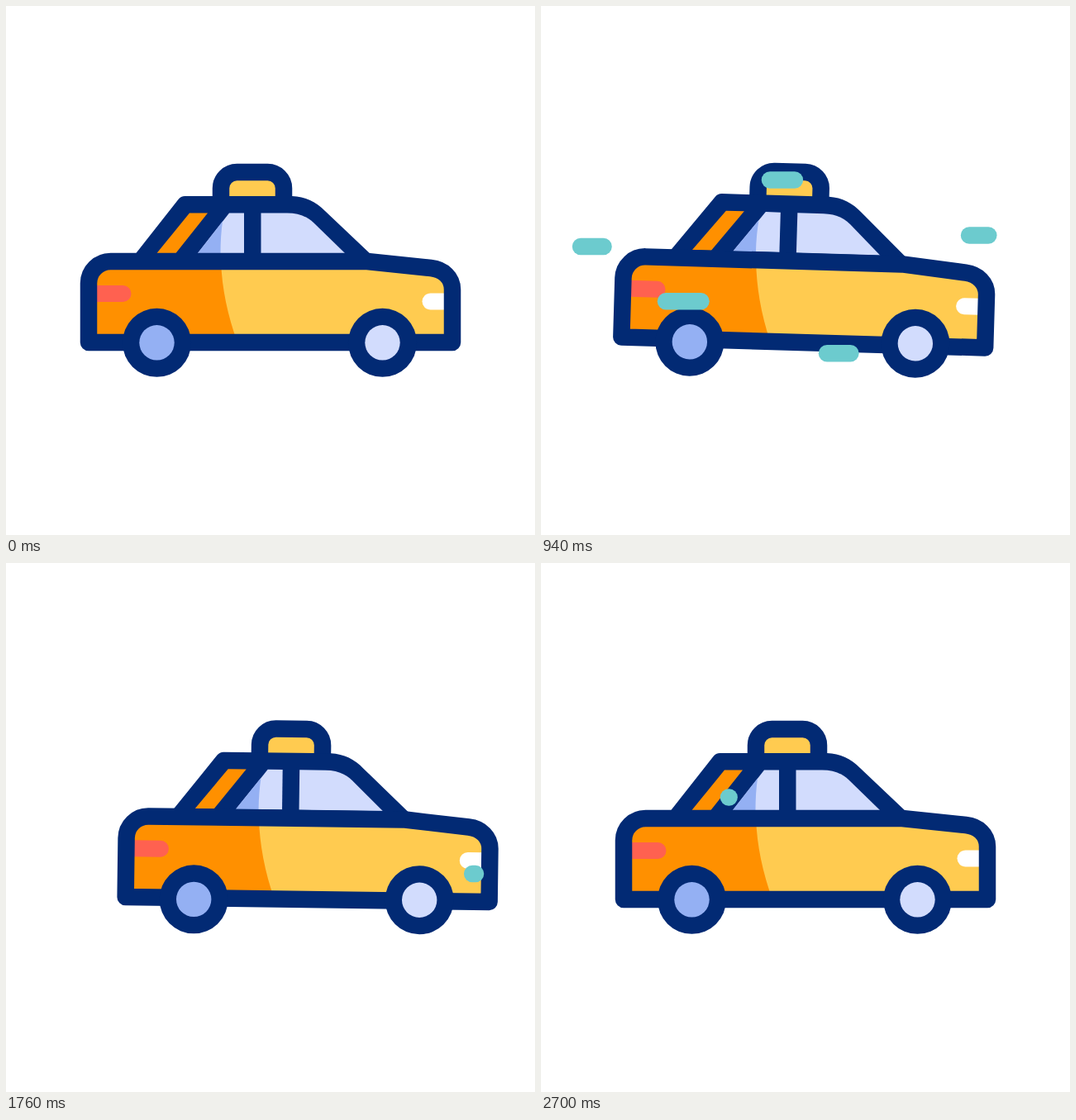
Recreate the animation shown at these times as an HTML page. Size 640 px wide and 640 px high, loop 2800 ms.

```html
<!DOCTYPE html>
<html lang="en">
<head>
<meta charset="utf-8">
<title>Taxi</title>
<style>
  html, body { margin: 0; width: 100%; height: 100%; overflow: hidden; background: #fff; }
  svg { display: block; width: 100%; height: 100%; }
  .navy { fill: #022a74; }
  .yellow { fill: #ffcb50; }
  .orange { fill: #ff9000; }
  .pale { fill: #d2dcfd; }
  .blue { fill: #94b0f3; }
  .red { fill: #ff6150; }
  .white { fill: #fff; }
  .line { stroke: #022a74; stroke-width: 20.5; stroke-linejoin: round; }
  #dashes { stroke: #6ccbce; stroke-width: 20.5; stroke-linecap: round; }
</style>
</head>
<body>
<svg viewBox="0 0 640 640">
  <g id="body">
    <path class="yellow line" d="M260 236V220.5A19.5 19.5 0 0 1 279.5 201H316.5A19.5 19.5 0 0 1 336 220.5V236"/>
    <path class="navy" d="M155 302L208.5 234Q211.5 230 216.5 230H346C362 230.5 375 237 386 248L443 302Z"/>
    <path class="orange" d="M222 250.5H244L205.5 299H182.5Z"/>
    <path class="pale" d="M270 250.5H288V299H232Z"/>
    <path class="blue" d="M262 260.5Q259.5 278 259.5 299H232Z"/>
    <path class="pale" d="M308.5 250.5H340C353 250.5 363.5 254 372.5 262.5L410 299H308.5Z"/>
    <path class="yellow" d="M240 309H437L514 317C529 318.5 540 329 540 343V407H240Z"/>
    <path class="orange" d="M100 407V335.5A26.5 26.5 0 0 1 126.5 309H260Q262 358 280 407Z"/>
    <path class="red" d="M108 338H141.5A10 10 0 0 1 141.5 358H108Z"/>
    <path class="white" d="M532 347.5H513.5A10 10 0 0 0 513.5 367.5H532Z"/>
    <path class="line" fill="none" d="M100 407V335.5A26.5 26.5 0 0 1 126.5 309H437L514 317C529 318.5 540 329 540 343V407Z"/>
  </g>
  <g id="wheels">
    <circle class="navy" cx="182.5" cy="407.3" r="41.5"/>
    <circle class="blue" cx="182.5" cy="407.3" r="21.2"/>
    <circle class="navy" cx="455.5" cy="407.3" r="41.5"/>
    <circle class="pale" cx="455.5" cy="407.3" r="21.2"/>
  </g>
  <g id="dashes"></g>
</svg>
<script>
const LOOP = 2800;
const $ = id => document.getElementById(id);

function ease(u) {
  u = Math.min(1, Math.max(0, u));
  return u * u * (3 - 2 * u);
}

// Eased moves between key poses [time, value, power]; a power above 1 delays the move
function track(...keys) {
  return t => keys.reduce((v, [end, to, power = 1], i) => {
    if (i === 0) return to;
    const start = keys[i - 1][0];
    const u = Math.max(0, (t - start) / (end - start));
    return v + (to - keys[i - 1][1]) * ease(u ** power);
  }, 0);
}

const shift = track([200, 0], [610, -21.5], [1600, 51], [1780, 44.5], [2700, 0, 1.4]);
const tilt = track([200, 0], [640, -2.5], [1000, 2], [1360, 0.75], [1940, 0.75], [2440, -1.4], [2700, 0]);

// A dash flies left: its head leaves first, its tail follows after the lag
function dash(span, lag, start, y, from, length) {
  const el = document.createElementNS("http://www.w3.org/2000/svg", "line");
  el.setAttribute("y1", y);
  el.setAttribute("y2", y);
  $("dashes").append(el);
  const at = t => from - length * ease((t - start) / span);
  return t => {
    const on = t > start && t < start + span + lag;
    el.setAttribute("visibility", on ? "visible" : "hidden");
    el.setAttribute("x1", at(t));
    el.setAttribute("x2", at(t - lag));
  };
}

const gust = (...place) => dash(500, 150, 440, ...place);
const late = (...place) => dash(510, 200, ...place);
const slow = (...place) => dash(840, 115, ...place);

const dashes = [
  gust(210.5, 417, 140),
  gust(291, 177, 129),
  gust(357.3, 350, 199),
  gust(420.3, 479, 133),
  slow(645, 277.5, 558, 140),
  late(1704, 376, 568, 110),
  late(1790, 210.2, 227, 145),
  late(1830, 389, 205, 125),
  slow(1775, 283.5, 406, 179)
];

function pose(id, x, angle) {
  $(id).setAttribute("transform", `translate(${x} 0) rotate(${angle} 320 402)`);
}

function draw() {
  const t = performance.now() % LOOP;
  pose("body", shift(t), tilt(t));
  pose("wheels", shift(t), tilt(t) / 4);
  dashes.forEach(move => move(t));
  requestAnimationFrame(draw);
}
draw();
</script>
</body>
</html>
```
